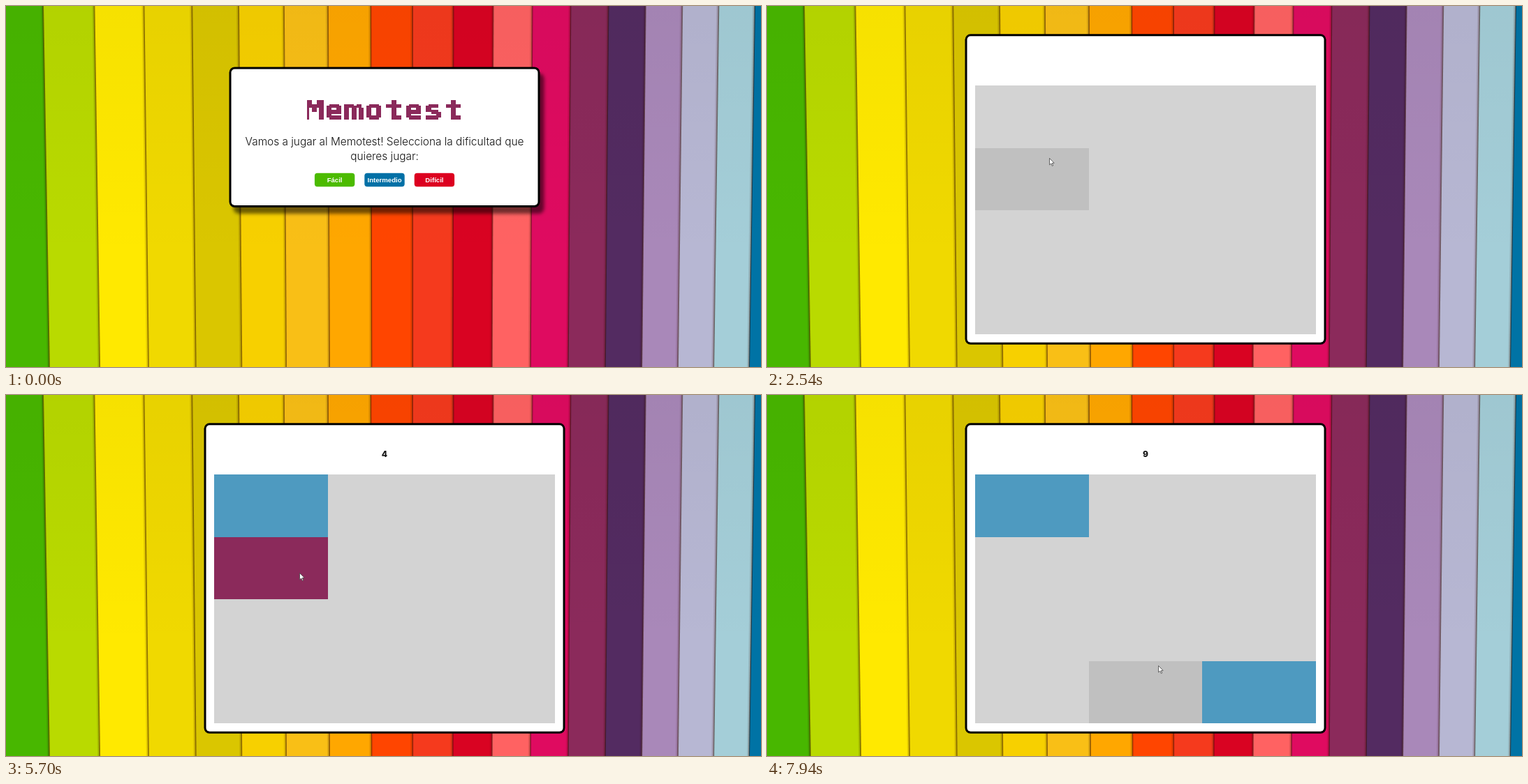
Recreate the animation shown at these times as an HTML page with a canvas. Size 1081x518 px, loop 8 s.

```html
<!DOCTYPE html>
<html lang="es">
<head>
<meta charset="utf-8">
<title>Memotest</title>
<style>
  html, body { margin: 0; width: 100%; height: 100%; overflow: hidden; }
  canvas { display: block; width: 1081px; height: 518px; }
</style>
</head>
<body>
<canvas id="stage" width="1081" height="518" aria-label="Memotest"></canvas>
<script>
const W = 1081, H = 518, LOOP = 8000;
const ctx = document.getElementById('stage').getContext('2d');

const GREEN = '#4cbb00', BLUE = '#0370a6', RED = '#d80323', YELLOW = '#ffe800';
const SKY = '#a5ced7', PLUM = '#8b2a5b', SILVER = '#c0c0c0';
const BODY_FONT = 'Inter, "Open Sans", sans-serif';

const STRIPES = [
  '#48b700', '#b9da00', '#ffe900', '#f0d900', '#dac600', '#f7d000', '#f9bf16',
  '#ffa700', '#ff4500', '#f53a1d', '#d90322', '#ff6262', '#df0b60', '#8b2a5b',
  '#532b61', '#a988b9', '#b7b7d3', '#a4ced8', '#0073a5'
];

// Pointer stops: arrival time, x, y. Each trip lasts at most TRIP.
const TRIP = 260;
const STOPS = [
  [260, 964, 496], [330, 945, 489], [790, 360, 207], [1420, 496, 260],
  [1600, 475, 245], [2540, 404, 218], [2690, 371, 172], [3600, 543, 173],
  [4010, 611, 165], [4490, 690, 245], [4810, 580, 254], [5150, 530, 250],
  [5600, 420, 255], [6000, 420, 325], [6310, 539, 328], [6710, 680, 335],
  [7400, 690, 420], [7740, 560, 406], [7940, 560, 388]
];

// Clicks: time, cell, colour. Blue is the matching pair and stays open.
const BOARD_AT = 1800, SHOW = 540, COUNT_LAG = 150;
const CLICKS = [
  [3010, 0, BLUE], [3870, 1, YELLOW], [4490, 5, RED],
  [5150, 4, GREEN], [5600, 3, PLUM], [6000, 6, SKY],
  [6400, 7, RED], [6710, 8, GREEN], [7400, 11, BLUE]
];

// Stripes narrow to the right and lean towards the middle
const edgeTop = i => 53 + 74.57 * i - 1.2287 * i * i + 0.02166 * i ** 3;
const edgeBottom = i => edgeTop(i) + (590 - edgeTop(i)) / 60;

const colX = i => Math.round(298 + 162.6 * i);
const rowY = j => Math.round(114.4 + 89.2 * j);

function text(str, x, y, font, color) {
  ctx.font = font;
  ctx.fillStyle = color;
  ctx.textAlign = 'center';
  ctx.fillText(str, x, y);
}

function box(x, y, w, h, r, color) {
  ctx.fillStyle = color;
  ctx.beginPath();
  ctx.roundRect(x, y, w, h, r);
  ctx.fill();
}

function seam(i, dx, width, color) {
  ctx.strokeStyle = color;
  ctx.lineWidth = width;
  ctx.beginPath();
  ctx.moveTo(edgeTop(i) + dx, 0);
  ctx.lineTo(edgeBottom(i) + dx, H);
  ctx.stroke();
}

function background() {
  ctx.fillStyle = STRIPES[0];
  ctx.fillRect(0, 0, W, H);
  for (let i = 0; i < STRIPES.length - 1; i++) {
    ctx.fillStyle = STRIPES[i + 1];
    ctx.beginPath();
    ctx.moveTo(edgeTop(i), 0);
    ctx.lineTo(W, 0);
    ctx.lineTo(W, H);
    ctx.lineTo(edgeBottom(i), H);
    ctx.fill();
    seam(i, -1, 4, 'rgba(50,15,0,.12)');
    seam(i, 0, 2, 'rgba(50,15,0,.4)');
  }
  const shade = ctx.createLinearGradient(0, 0, 0, H);
  shade.addColorStop(0, 'rgba(0,0,0,.035)');
  shade.addColorStop(0.7, 'rgba(0,0,0,0)');
  ctx.fillStyle = shade;
  ctx.fillRect(0, 0, W, H);
}

function card(x, y, w, h) {
  box(x, y, w, h, 8, '#000');
  ctx.shadowColor = 'transparent';
  box(x + 3, y + 3, w - 6, h - 6, 5, '#fff');
}

// Small bold text with hard pixels, to be drawn enlarged
function pixelText(str, color) {
  const c = document.createElement('canvas');
  c.width = str.length * 8;
  c.height = 11;
  const g = c.getContext('2d');
  g.font = 'bold 13.3px "DejaVu Sans Mono", monospace';
  g.fillStyle = color;
  g.fillText(str, 0, 10);
  const img = g.getImageData(0, 0, c.width, c.height);
  for (let i = 3; i < img.data.length; i += 4)
    img.data[i] = img.data[i] > 115 ? 255 : 0;
  g.putImageData(img, 0, 0);
  return c;
}
const title = pixelText('Memotest', PLUM);

function menu() {
  ctx.save();
  ctx.shadowColor = 'rgba(0,0,0,.55)';
  ctx.shadowBlur = 5;
  ctx.shadowOffsetX = 6;
  ctx.shadowOffsetY = 9;
  card(319.5, 87.5, 445, 201.5);
  ctx.restore();

  ctx.imageSmoothingEnabled = false;
  ctx.drawImage(title, 427, 135, title.width * 3.56, title.height * 2.8);

  const font = '300 15.4px ' + BODY_FONT;
  text('Vamos a jugar al Memotest! Selecciona la dificultad que', 542, 200, font, '#111');
  text('quieres jugar:', 542, 220.5, font, '#111');

  [['Fácil', GREEN], ['Intermedio', '#0070a6'], ['Difícil', '#dc0020']].forEach(([label, color], i) => {
    const x = 542 + (i - 1) * 71.4;
    box(x - 28.7, 239.7, 57.4, 19.6, 4, color);
    text(label, x, 252.5, 'bold 9.6px "Liberation Sans", Arial, sans-serif', '#fff');
  });
}

function board(t, p) {
  card(283.5, 40.3, 517, 445.5);
  const colors = Array(12).fill(SILVER);
  for (const [at, cell, color] of CLICKS)
    if (t >= at && (color === BLUE || t < at + SHOW)) colors[cell] = color;
  colors.forEach((color, n) => {
    const i = n % 3, j = Math.floor(n / 3);
    const x = colX(i), y = rowY(j), w = colX(i + 1) - x, h = rowY(j + 1) - y;
    const hover = p.x >= x && p.x < x + w && p.y >= y && p.y < y + h;
    ctx.globalAlpha = hover ? 1 : 0.7;
    ctx.fillStyle = color;
    ctx.fillRect(x, y, w, h);
  });
  ctx.globalAlpha = 1;
  const count = CLICKS.filter(([at]) => t >= at + COUNT_LAG).length;
  if (count) text(count, 542, 89.3, '800 12px ' + BODY_FONT, '#111');
}

function pointerAt(t) {
  let [, x, y] = STOPS[0];
  for (let k = 1; k < STOPS.length; k++) {
    const [end, tx, ty] = STOPS[k];
    const trip = Math.min(TRIP, end - STOPS[k - 1][0]);
    const u = Math.min(1, Math.max(0, (t - end + trip) / trip));
    const ease = u * u * (3 - 2 * u);
    x += (tx - x) * ease;
    y += (ty - y) * ease;
  }
  return { x, y };
}

const ARROW = new Path2D('M0 0V9.4L2.2 7.5L3.8 11L5.2 10.4L3.7 7L6.6 6.8Z');

function pointer({ x, y }) {
  ctx.save();
  ctx.translate(x + 0.5, y + 0.5);
  ctx.fillStyle = '#fff';
  ctx.fill(ARROW);
  ctx.lineWidth = 0.8;
  ctx.strokeStyle = '#444';
  ctx.stroke(ARROW);
  ctx.restore();
}

function draw(now) {
  const t = now % LOOP, p = pointerAt(t);
  background();
  if (t < BOARD_AT) menu();
  else board(t, p);
  if (t >= STOPS[0][0]) pointer(p);
}

const start = performance.now();
function tick() {
  draw(performance.now() - start);
  requestAnimationFrame(tick);
}
tick();
</script>
</body>
</html>
```
